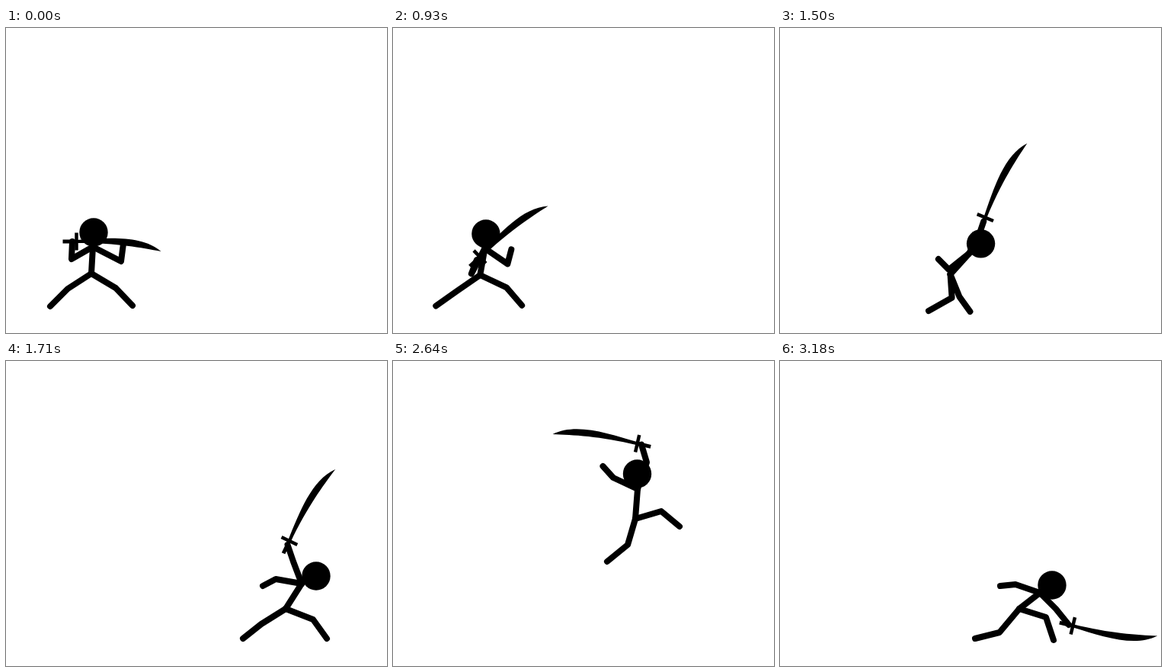
Recreate the animation shown at these times as an HTML page with a canvas. Size 500x400 px, loop 3210 ms.

```html
<!DOCTYPE html>
<html lang="en">
<head>
<meta charset="utf-8">
<title>Stick swordsman</title>
<style>
  html, body { margin: 0; width: 100%; height: 100%; overflow: hidden; background: #fff; }
  canvas { display: block; }
</style>
</head>
<body>
<canvas id="stage" width="500" height="400"></canvas>
<script>
const ctx = document.getElementById('stage').getContext('2d');
const LOOP = 3210, STEP = 30, FLIP_AT = 2160;
const RAD = Math.PI / 180;

// Each joint hangs from its parent; the hip is the root.
const parent = {
  neck: 'hip', head: 'neck',
  elbowA: 'neck', handA: 'elbowA',
  elbowB: 'neck', handB: 'elbowB',
  kneeL: 'hip', footL: 'kneeL',
  kneeR: 'hip', footR: 'kneeR'
};
const tracks = {};

function addKey(name, t, v) {
  (tracks[name] = tracks[name] || []).push([t, v]);
}

// Stores a pose as hip position plus angle and length of every bone given.
function pose(t, sword, joints) {
  addKey('sword', t, sword * RAD);
  addKey('hipX', t, joints.hip[0]);
  addKey('hipY', t, joints.hip[1]);
  for (const j in parent) {
    if (!joints[j]) continue;
    const p = joints[parent[j]];
    const dx = joints[j][0] - p[0], dy = joints[j][1] - p[1];
    let a = Math.atan2(dy, dx);
    const keys = tracks[j + 'Ang'];
    if (keys) {
      const last = keys[keys.length - 1][1];
      a -= Math.round((a - last) / (2 * Math.PI)) * 2 * Math.PI;
    }
    addKey(j + 'Ang', t, a);
    addKey(j + 'Len', t, Math.hypot(dx, dy));
  }
}

pose(0, 0, {
  hip: [112, 322], neck: [114, 287], head: [115, 268],
  elbowA: [86, 303], handA: [87, 280], elbowB: [151, 306], handB: [154, 283],
  kneeL: [81, 342], footL: [58, 365], kneeR: [144, 341], footR: [166, 364]
});
pose(540, -124, {
  hip: [112, 324], neck: [108, 289], head: [102, 270],
  elbowA: [84, 311], handA: [61, 309], elbowB: [147, 300], handB: [152, 281],
  kneeL: [81, 344], footL: [55, 365], kneeR: [147, 340], footR: [166, 364]
});
pose(660, -160, { hip: [110, 324], neck: [104, 290], elbowA: [79, 308], handA: [56, 312] });
pose(870, -25, { hip: [114, 324], neck: [118, 289], elbowA: [96, 322], handA: [108, 307] });
pose(1110, -148, { hip: [115, 324], neck: [127, 289], elbowA: [123, 316], handA: [101, 312] });
pose(1260, -154, {
  hip: [119, 324], neck: [135, 290], head: [145, 274.5],
  elbowA: [146, 317], handA: [122, 316], elbowB: [147, 321], handB: [152, 302],
  kneeL: [90, 347], footL: [61, 365], kneeR: [153, 341], footR: [174, 364]
});
pose(1440, -115, {
  hip: [185, 322], neck: [207, 292], elbowA: [202, 264], handA: [192, 250],
  kneeL: [201, 345], footL: [170, 362], kneeR: [183, 350], footR: [195, 366]
});
pose(1590, 0, {
  hip: [292, 325], neck: [319, 301], elbowA: [344, 305], handA: [367, 306],
  kneeL: [262, 346], footL: [233, 364], kneeR: [328, 338], footR: [346, 364]
});
pose(1710, -64, {
  hip: [367, 325], neck: [388, 292], head: [407, 282],
  elbowA: [377, 263], handA: [369.5, 241], elbowB: [354, 286], handB: [337, 295],
  kneeL: [335, 345], footL: [311, 364], kneeR: [403, 339], footR: [421, 364]
});
pose(1880, -167, { hip: [362, 325], neck: [375, 290], elbowA: [352, 272], handA: [338, 262] });
pose(2040, 5, { hip: [375, 326], neck: [405, 302], elbowA: [430, 310], handA: [454, 312] });
pose(2280, -84, {
  hip: [374, 326], neck: [407, 304], head: [427, 300],
  elbowA: [431, 319], handA: [456, 319], elbowB: [409, 338], handB: [422, 353],
  kneeL: [356, 356], footL: [324, 364], kneeR: [410, 331], footR: [422, 364]
});
pose(2640, -167, {
  hip: [318, 207], neck: [321, 168], head: [320.5, 148],
  elbowA: [333, 133], handA: [326, 109.5], elbowB: [289, 153], handB: [275.5, 138],
  kneeL: [308, 241], footL: [281, 263], kneeR: [352, 197], footR: [376, 217]
});
pose(3180, 13.5, {
  hip: [314, 325], neck: [341, 304], head: [357, 294],
  elbowA: [362, 325], handA: [379, 346], elbowB: [309, 293], handB: [289, 295],
  kneeL: [288, 356], footL: [256, 364], kneeR: [349, 336], footR: [359, 366]
});

function secant(k, i) {
  return (k[i + 1][1] - k[i][1]) / (k[i + 1][0] - k[i][0]);
}

// Slope at a key: flat at turning points so nothing overshoots.
function slope(k, i) {
  if (i === 0) return secant(k, 0);
  if (i === k.length - 1) return secant(k, i - 1);
  const a = secant(k, i - 1), b = secant(k, i);
  return a * b <= 0 ? 0 : 2 * a * b / (a + b);
}

function value(name, t) {
  const k = tracks[name];
  let i = 0;
  while (i < k.length - 2 && t >= k[i + 1][0]) i++;
  const h = k[i + 1][0] - k[i][0], u = (t - k[i][0]) / h;
  const u2 = u * u, u3 = u2 * u;
  return (2 * u3 - 3 * u2 + 1) * k[i][1] + (u3 - 2 * u2 + u) * h * slope(k, i) +
         (3 * u2 - 2 * u3) * k[i + 1][1] + (u3 - u2) * h * slope(k, i + 1);
}

function solve(t) {
  const at = { hip: [value('hipX', t), value('hipY', t)] };
  for (const j in parent) {
    const [x, y] = at[parent[j]];
    const a = value(j + 'Ang', t), r = value(j + 'Len', t);
    at[j] = [x + r * Math.cos(a), y + r * Math.sin(a)];
  }
  return at;
}

function line(...pts) {
  ctx.beginPath();
  for (const p of pts) ctx.lineTo(p[0], p[1]);
  ctx.stroke();
}

function drawSword(hand, angle, flip) {
  ctx.save();
  ctx.translate(hand[0], hand[1]);
  ctx.rotate(angle);
  ctx.translate(5.5, 0);
  ctx.scale(1, flip);
  ctx.beginPath();
  ctx.moveTo(0, -2);
  ctx.bezierCurveTo(40, -4.5, 85, -9, 111, 13);
  ctx.bezierCurveTo(85, 8, 50, 1.5, 0, 2);
  ctx.fill();
  ctx.fillRect(-18, -2.5, 19, 5);
  ctx.fillRect(-2.25, -11.5, 4.5, 23);
  ctx.restore();
}

function draw(t) {
  ctx.fillStyle = '#fff';
  ctx.fillRect(0, 0, 500, 400);
  ctx.fillStyle = ctx.strokeStyle = '#000';
  ctx.lineWidth = 8;
  ctx.lineCap = ctx.lineJoin = 'round';
  const p = solve(t);
  line(p.neck, p.hip);
  line(p.hip, p.kneeL, p.footL);
  line(p.hip, p.kneeR, p.footR);
  line(p.neck, p.elbowA, p.handA);
  line(p.neck, p.elbowB, p.handB);
  ctx.beginPath();
  ctx.arc(p.head[0], p.head[1], 18.7, 0, 2 * Math.PI);
  ctx.fill();
  drawSword(p.handA, value('sword', t), t < FLIP_AT ? 1 : -1);
}

const start = performance.now();
function tick() {
  const t = (performance.now() - start) % LOOP;
  draw(Math.floor(t / STEP) * STEP);
  requestAnimationFrame(tick);
}
tick();
</script>
</body>
</html>
```
